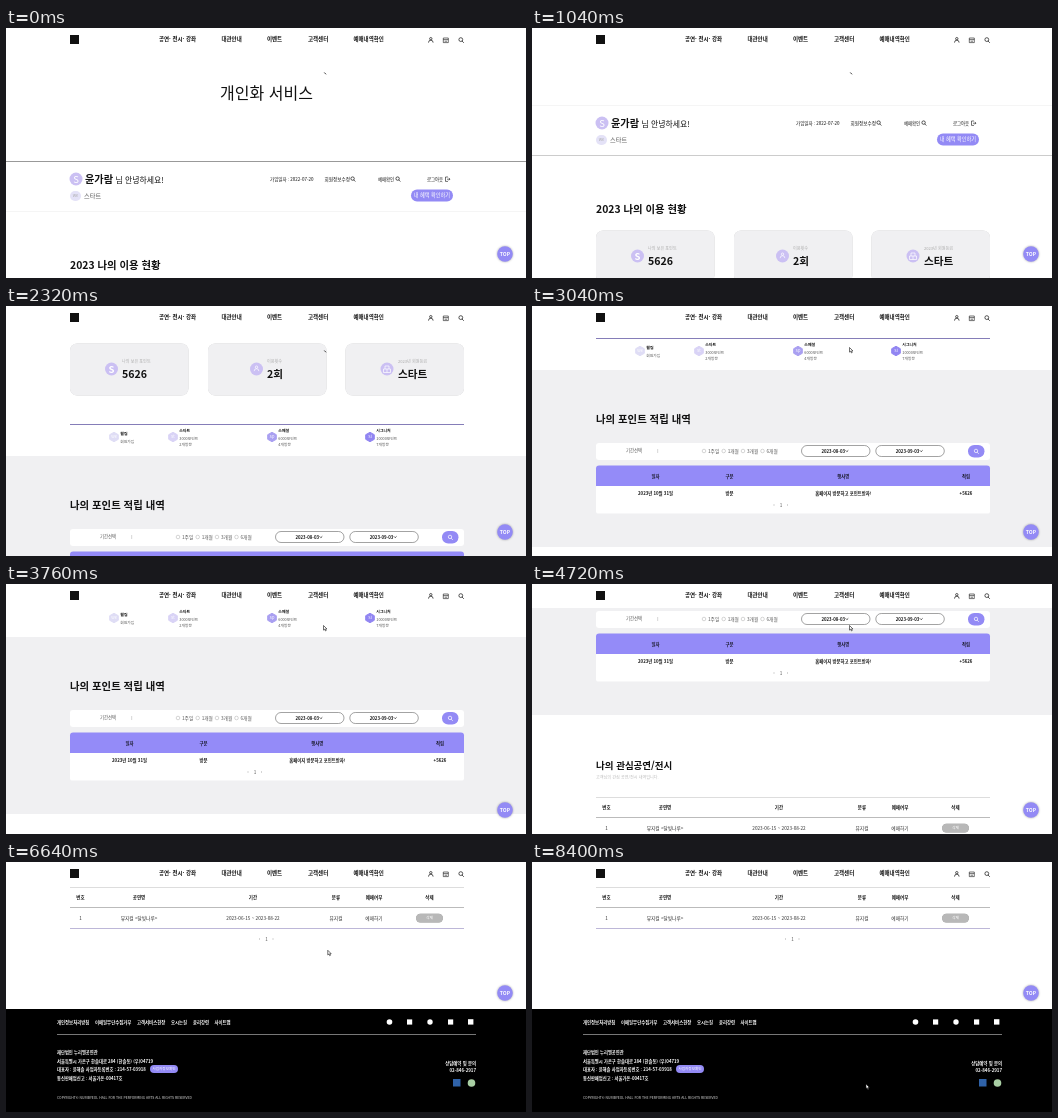
Recreate the animation shown at these times as an HTML page. Size 520x250 px, loop 8880 ms.

```html
<!DOCTYPE html>
<html lang="ko">
<head>
<meta charset="utf-8">
<title>개인화 서비스</title>
<style>
html, body { margin: 0; width: 100%; height: 100%; overflow: hidden; background: #fff; }
svg { display: block; font-family: "Noto Sans CJK KR", "Noto Sans KR", "Noto Sans CJK", sans-serif; }
</style>
</head>
<body>
<svg id="stage" width="520" height="250" viewBox="0 0 520 250"></svg>
<script>
const LOOP = 8880, STEP = 80, FOOTER = 752;
const PURPLE = '#938af5', PALE = '#cbc0f3', INK = '#111', GRAY = '#555';

// y is the optical middle of the line
const text = (x, y, size, str, fill = INK, weight = 400, anchor = 'start') =>
  `<text x="${x}" y="${y + size * .37}" font-size="${size}" fill="${fill}" font-weight="${weight}" text-anchor="${anchor}">${str}</text>`;
const mid = (x, y, size, str, fill, weight) => text(x, y, size, str, fill, weight, 'middle');
const box = (x, y, w, h, fill, r = 0, extra = '') =>
  `<rect x="${x}" y="${y}" width="${w}" height="${h}" rx="${r}" fill="${fill}" ${extra}/>`;
const dot = (x, y, r, fill, extra = '') => `<circle cx="${x}" cy="${y}" r="${r}" fill="${fill}" ${extra}/>`;
const path = (d, color = INK, w = .7) => `<path d="${d}" fill="none" stroke="${color}" stroke-width="${w}"/>`;
const lens = (x, y, color = INK, r = 1.7) =>
  path(`M${x - r - .4} ${y - .4}a${r} ${r} 0 1 1 ${2 * r} 0a${r} ${r} 0 1 1 ${-2 * r} 0M${x + r * .4} ${y + r * .5}l${r} ${r}`, color);
const person = (x, y, color) =>
  dot(x, y - 1.3, 1.2, 'none', `stroke="${color}" stroke-width=".7"`) +
  path(`M${x - 2.3} ${y + 2.6}q0 -2.4 2.3 -2.4t2.3 2.4`, color);
const pager = (x, y) => mid(x, y, 4.6, '1', GRAY) +
  path(`M${x - 6.5} ${y - 1}l-1 1l1 1M${x + 6} ${y - 1}l1 1l-1 1`, '#aaa', .5);

function profile() {
  return mid(260.5, 65, 16, '개인화 서비스') +
    box(0, 133, 520, 1, '#999', 0, 'id="upper"') + box(0, 183, 520, 1, '#ccc', 0, 'id="lower"') +
    dot(70, 151, 6.5, PALE) + mid(70, 151, 9.5, 'S', '#fff', 500) +
    text(79, 151, 10.2, '윤가람', INK, 700) + text(109.5, 152, 7.9, '님 안녕하세요!') +
    box(64, 163, 11, 10, '#e4e2f7', 5) + mid(69.5, 168, 3.8, 'We', '#aaa') +
    text(78, 167.5, 6.2, '스타트', GRAY) +
    text(264, 151, 4.5, '가입일자 : 2022-07-20') +
    text(318.5, 151, 4.6, '회원정보수정') + lens(347, 151) +
    text(372, 151, 4.4, '예매확인') + lens(392, 151) +
    text(421, 151, 4.4, '로그아웃') + path('M442 149h-2.5v4.4h2.5M441 151.2h3l-1.2 -1.2m1.2 1.2l-1.2 1.2', INK, .6) +
    box(405, 161.5, 42, 12, PURPLE, 6) + mid(426, 167.5, 5.2, '내 혜택 확인하기', '#fff');
}

function cards() {
  const card = (x, cx, tx, label, value) =>
    box(x, 258.5, 118.5, 52, '#f0f0f2', 7, 'style="filter:drop-shadow(0 .3px .5px #0003)"') +
    dot(cx, 284, 6.5, PALE) + text(tx, 276, 4.1, label, '#aaa') + text(tx, 289, 10.6, value, INK, 700);
  return text(64, 237, 10.4, '2023 나의 이용 현황', INK, 700) +
    card(64, 105.5, 116, '나의 보유 포인트', '5626') + mid(105.5, 284, 9.5, 'S', '#fff', 700) +
    card(202, 250.5, 261, '이용횟수', '2회') + person(250.5, 283.5, '#fff') +
    card(339.5, 381, 392, '2023년 회원등급', '스타트') +
    path('M379 284v-3h4v3M377.5 284h7v3.5h-7zM381 284v3.5', '#fff');
}

function grades() {
  const rows = [
    [108, 'We', '#dfddf5', '웰컴', '회원가입'],
    [167, 'St', '#d9d3f6', '스타트', '3000포인트', '2개방문'],
    [266, 'Sp', '#a99ff1', '스페셜', '6000포인트', '4개방문'],
    [364, 'Si', '#9185f2', '시그니처', '10000포인트', '7개방문']];
  return box(64, 339, 394, 1, '#857db8') + rows.map(([x, mark, fill, name, a, b]) =>
    `<path d="M${x} 347.3l4.3 2.4v4.6l-4.3 2.4l-4.3 -2.4v-4.6z" fill="${fill}" stroke="${fill}" stroke-linejoin="round"/>` +
    mid(x, 352, 4, mark, '#fff') + text(x + 6.3, b ? 345.8 : 348.5, 3.9, name, INK, 700) +
    text(x + 6.3, b ? 353.3 : 356.3, 3.8, a, GRAY) + (b ? text(x + 6.3, 359.3, 3.8, b, GRAY) : '')).join('');
}

function points() {
  const radio = (x, label) => dot(x, 452, 1.8, '#fff', 'stroke="#aaa" stroke-width=".5"') + text(x + 4, 452, 4.7, label, GRAY);
  const select = (x, date) => box(x, 446.5, 68.5, 11, '#fff', 5.5, 'stroke="#666" stroke-width=".6"') +
    text(x + 20, 452, 4.3, date, INK, 700) + path(`M${x + 44} 451.3l1.4 1.4l1.4 -1.4`);
  const row = (y, cells, color) =>
    [123.5, 197.5, 311.3, 434].map((x, i) => mid(x, y, 4.35, cells[i], color, 700)).join('');
  return box(0, 371, 520, 177, '#f0f0f2') +
    text(64, 420, 10.4, '나의 포인트 적립 내역', INK, 700) +
    box(64, 444, 394, 17, '#fff', 3) + mid(102, 451.5, 4.4, '기간선택', GRAY) + box(125.5, 450, .6, 4, '#bbb') +
    radio(172, '1주일') + radio(191.7, '1개월') + radio(211, '3개월') + radio(230.5, '6개월') +
    select(269.5, '2023-08-03') + select(343.8, '2023-09-03') +
    box(436, 446, 16.5, 12.5, PURPLE, 6.2) + lens(444.4, 452.3, '#fff') +
    box(64, 486, 394, 28.5, '#fff', 2) +
    `<path d="M64 487v-17.5q0 -3 3 -3h388q3 0 3 3v17.5z" fill="#948bf8"/>` +
    row(477, ['일자', '구분', '행사명', '적립'], '#1a1a2a') +
    row(494.3, ['2023년 10월 31일', '방문', '홈페이지 방문하고 포인트받자!', '+5626'], INK) +
    pager(249, 506);
}

function interests() {
  const row = (y, size, cells, color, weight) =>
    [74.5, 133, 247, 330, 368, 423.5].map((x, i) => mid(x, y, size, cells[i], color, weight)).join('');
  return text(64, 598, 9.5, '나의 관심공연/전시', INK, 700) +
    text(64, 610.5, 4.1, '고객님의 관심 공연/전시 내역입니다.', '#bbb') +
    box(64, 630, 394, 1, '#ddd') + box(64, 650, 394, 1, '#bbb') + box(64, 671, 394, 1, '#bdb7d8') +
    row(640.7, 4.5, ['번호', '공연명', '기간', '분류', '예매여부', '삭제'], INK, 700) +
    box(410, 656.8, 27, 8.6, '#b8b8b8', 4.3, 'style="filter:drop-shadow(0 .5px .6px #0006)"') +
    row(661, 4.7, ['1', '뮤지컬 &lt;달빛나루&gt;', '2023-06-15 ~ 2023-08-22', '뮤지컬', '예매하기', ''], '#333') +
    mid(423.5, 661, 3.9, '삭제', '#fff') + pager(260.5, 682);
}

function footer() {
  const links = [[51, '개인정보처리방침'], [89, '이메일무단수집거부'], [131, '고객서비스헌장'],
    [165, '오시는길'], [187, '윤리강령'], [208.5, '사이트맵']];
  const info = [[795, '재단법인 누리별공연관'], [804, '서울특별시 가온구 한솔대로 284 (한솔동) (우)04719'],
    [812, '대표자 : 윤해솔 사업자등록번호 : 214-57-03918'], [821, '통신판매업신고 : 서울가온-00417호']];
  return box(0, FOOTER, 520, 110, '#000') +
    links.map(([x, s]) => text(x, 765, 4.4, s, '#fff', 700)).join('') +
    dot(383.5, 765, 2.8, '#fff') + box(401, 762.4, 5.2, 5.2, '#fff') + dot(424, 765, 2.7, '#fff') +
    box(442, 762.4, 5.2, 5.2, '#fff') + box(462, 762.2, 5.4, 5.4, '#fff') +
    box(51, 777, 419, 1, '#777') +
    info.map(([y, s]) => text(51, y, 4.3, s, '#fff', 700)).join('') +
    box(144, 808, 28, 8, PURPLE, 4) + mid(158, 812, 3.6, '사업자정보확인', '#fff') +
    text(51, 841, 3.45, 'COPYRIGHT© NURIBYEOL HALL FOR THE PERFORMING ARTS ALL RIGHTS RESERVED', '#ddd') +
    text(470, 806.5, 4.4, '상담예약 및 문의', '#fff', 700, 'end') +
    text(470, 813.5, 4.4, '02-846-2917', '#fff', 700, 'end') +
    box(447, 822, 7.5, 7.5, '#2f62a8') + dot(465.5, 826, 3.8, '#a9cfa4');
}

function header() {
  const nav = [[153, '공연· 전시· 강좌'], [215.5, '대관안내'], [261, '이벤트'], [302, '고객센터'], [347.5, '예매내역확인']];
  return box(0, 0, 520, 24, '#fff') + box(64, 7, 9, 9, '#111') +
    nav.map(([x, s]) => text(x, 11.3, 5.5, s, '#111', 700)).join('') +
    person(424.8, 12, INK) + path('M437.3 10h5v4.6h-5zM437.3 11.6h5M438.6 13.2h2.4', INK, .6) + lens(455.2, 12, INK, 1.9);
}

stage.innerHTML =
  `<g id="page">${profile()}${cards()}${grades()}${points()}${interests()}${footer()}</g>` + header() +
  `<g id="toTop">${dot(0, 0, 7.8, PURPLE, 'style="filter:drop-shadow(0 .6px 1px #0005)"')}${mid(0, .2, 5.1, 'TOP', '#fff', 700)}</g>` +
  `<g id="pointer"><path id="arrow" d="M0 0v4.6l1.1 -.9l.8 1.7l.8 -.4l-.7 -1.6h1.4z" fill="#fff" stroke="#111" stroke-width=".6"/>` +
  `<path id="speck" d="M.8 3l1.7 1.8" stroke="#222" stroke-width=".9"/></g>`;
const parts = Object.fromEntries(['page', 'toTop', 'pointer', 'arrow', 'speck', 'upper', 'lower']
  .map(id => [id, document.getElementById(id)]));

// time, scroll offset
const scrollKeys = [[0, 0], [480, 0], [1040, 56], [1920, 156], [2320, 221], [2400, 221], [3120, 318], [3760, 318],
  [4560, 417], [4720, 417], [4960, 440], [5040, 440], [5680, 570], [5760, 575], [5840, 575], [6320, 605], [LOOP, 605]];

function along(keys, t) {
  const i = keys.findIndex(k => k[0] > t);
  const [t0, a] = keys[i - 1], [t1, b] = keys[i];
  return a + (b - a) * (t - t0) / (t1 - t0);
}

const move = (el, x, y) => el.setAttribute('transform', `translate(${x} ${y})`);
const start = performance.now();

function draw() {
  const now = Math.max(0, performance.now() - start) % LOOP;
  const t = Math.floor(now / STEP) * STEP;
  const s = Math.round(along(scrollKeys, t));
  move(parts.page, 0, -s);
  move(parts.toTop, 499, Math.min(226, FOOTER - 16 - s));
  const p = Math.min(1, Math.max(0, (t - 6320) / 960)), ease = p * p * (3 - 2 * p);
  move(parts.pointer, 317.5 + 16.5 * ease, 41.5 + 180.5 * ease);
  parts.arrow.setAttribute('opacity', t < 2480 ? 0 : 1);
  parts.speck.setAttribute('opacity', t < 2480 ? 1 : 0);
  // thin rules alternate in strength as the page leaves its rest position
  parts.upper.setAttribute('opacity', s ? .1 : 1);
  parts.lower.setAttribute('opacity', s ? 1 : .2);
  requestAnimationFrame(draw);
}
draw();
</script>
</body>
</html>
```
